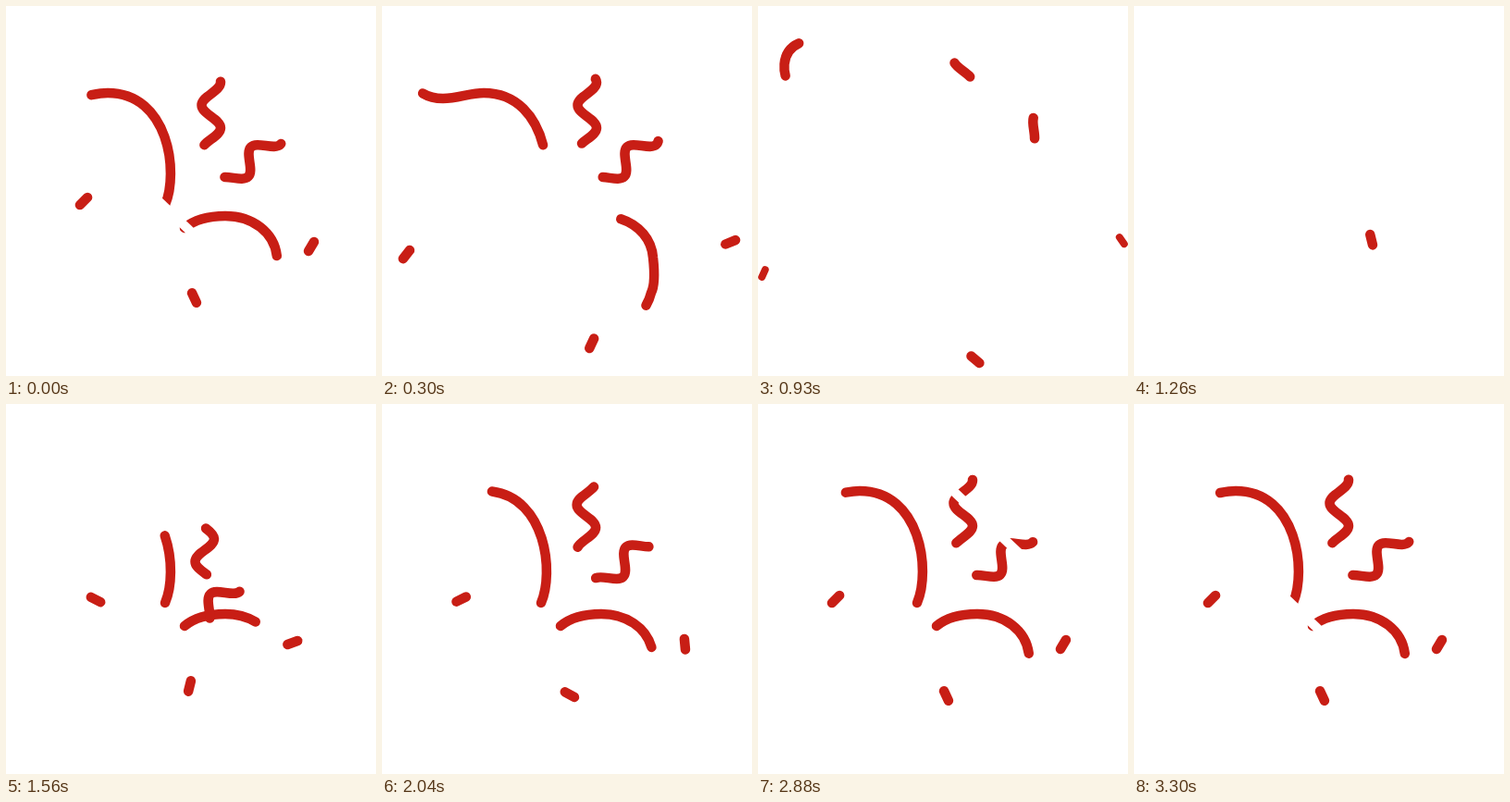
An HTML page that plays this animation: 400x400 px, repeating every 3.33 s.

```html
<!DOCTYPE html>
<html lang="en">
<head>
<meta charset="utf-8">
<title>Burst</title>
<style>
  html, body { margin: 0; width: 100%; height: 100%; overflow: hidden; background: #fff; }
  svg { display: block; width: 100vw; height: 100vh; }
  path { fill: none; stroke: #c81e15; stroke-width: 10.5; stroke-linecap: round; stroke-linejoin: round; }
  #wipe { stroke: #fff; stroke-width: 10; stroke-linecap: butt; }
</style>
</head>
<body>
<svg id="stage" viewBox="0 0 400 400"></svg>
<script>
const LOOP = 3330, STEP = 30, BURST = 1200, RATE = 4.3;
const stage = document.getElementById('stage');

function addPath(d = '') {
  const p = document.createElementNS('http://www.w3.org/2000/svg', 'path');
  p.setAttribute('d', d);
  stage.appendChild(p);
  return p;
}

const show = (el, on) => { el.style.visibility = on ? 'visible' : 'hidden'; };
const mix = (a, b, u) => a + (b - a) * u;

// Exponential settling while bursting: 1 at 1560 ms, falling towards 0.
const lagAt = (t, rate = RATE) => Math.exp(-rate * (t - 1560) / 1000);

// Rounded zigzag that climbs from y = 181.
function zigzag() {
  const x = i => i % 2 ? 211.5 : 232, y = i => 181 - 24.6 * i, bend = 9.5;
  let d = `M${x(0)} ${y(0)}`;
  for (let i = 1; i < 6; i++) {
    d += `C${x(i - 1)} ${y(i - 1) - bend} ${x(i)} ${y(i) + bend} ${x(i)} ${y(i)}`;
  }
  return d;
}

// tail, head: ends along the path at rest; *Lag: how far behind while bursting;
// tailPow, headPow: easing of the way out, which is over at `end`.
const arc = { tail: 0, tailLag: 0, tailPow: 1.18, headPow: 0.75 };
const wave = {
  d: zigzag(), tail: 40, head: 133, tailLag: 26, headLag: 52,
  rate: RATE, end: 1000, tailPow: 3.3, headPow: 1.95
};
const ribbons = [
  {
    ...arc, head: 176, headLag: 102, rate: 2.8, end: 1110,
    d: 'M172 215C187 180 176 94 110 94C95 94 82 100 66 100C40 100 27 82 28.5 63C30 46 42 38 60 37'
  },
  {
    ...arc, head: 124, headLag: 43, rate: 3.7, end: 900,
    d: 'M193 240C205 230 220 227 237 227C268 227 291 246 293 272C295 290 295 302 291 310'
      + 'C286 330 272 342 252 342.5C240 343 228 338 224 333'
  },
  { ...wave, delay: 0, at: [212, 106], turn: 0 },
  { ...wave, delay: 60, at: [266, 152], turn: 45 }
];

// lag: offset from rest at 1560 ms; turn: degrees still to spin then; outTurn: degrees spun by 630 ms.
const dashes = [
  { rest: [84, 211], drift: [-79.5, 79.5], lag: [13, 0.5], angle: -45, turn: 72, outTurn: -14, start: 1320, end: 1020 },
  { rest: [330, 260], drift: [64.5, -6.5], lag: [-20.2, -2], angle: 121, turn: -141, outTurn: 77, start: BURST, end: 1020 },
  { rest: [203.5, 315.5], drift: [32, 68], lag: [-5, -10.5], angle: 65, turn: -141, outTurn: 105, start: 1320, end: 1140 }
];

for (const r of ribbons) {
  r.el = addPath(r.d);
  r.length = r.el.getTotalLength();
}
for (const d of dashes) d.el = addPath('M-5.8 0H5.8');
const wipe = addPath('M-105 0H105');
wipe.id = 'wipe';

function drawRibbon(r, t) {
  const leaving = t < BURST, late = leaving ? 0 : lagAt(t - (r.delay || 0), r.rate);
  const u = leaving ? Math.min(1, t / r.end) : 0;
  const from = Math.max(0, mix(r.tail, r.length, u ** r.tailPow) - r.tailLag * late);
  const to = mix(r.head, r.length, u ** r.headPow) - r.headLag * late;
  show(r.el, to - from > 0.5);
  r.el.style.strokeDasharray = Math.max(0.1, to - from) + ' 2000';
  r.el.style.strokeDashoffset = -from;
  if (r.at) {
    const x = r.at[0] - 7 * late, y = r.at[1] + 14 * late;
    r.el.setAttribute('transform', `translate(${x} ${y}) rotate(${r.turn}) translate(-212 -106)`);
  }
}

function drawDash(d, t) {
  const leaving = t < BURST;
  show(d.el, leaving ? t < d.end : t >= d.start);
  const gone = 1 - Math.exp(-RATE * t / 1000), late = lagAt(t);
  const [x, y] = d.rest.map((v, i) => v + (leaving ? d.drift[i] * gone : d.lag[i] * late));
  const spin = leaving ? d.outTurn * t / 630 : d.turn * (Math.max(0, 2350 - t) / 790) ** 1.45;
  const size = leaving ? Math.max(0, Math.min(1, (d.end - t) / 120)) : 1;
  d.el.setAttribute('transform', `translate(${x} ${y}) rotate(${d.angle + spin}) scale(${size})`);
}

// White bar that slides down-left and stops at the mouth of the burst.
function drawWipe(t) {
  show(wipe, t < STEP || t >= 2730);
  const u = t < STEP ? 1 : Math.min(1, Math.max(0, t - 2700) / 600);
  const off = 134 * (1 - u ** 1.7);
  wipe.setAttribute('transform', `translate(183 228) rotate(43.4) translate(0 ${-off})`);
}

function draw(ms) {
  const t = Math.floor((ms % LOOP) / STEP) * STEP;
  ribbons.forEach(r => drawRibbon(r, t));
  dashes.forEach(d => drawDash(d, t));
  drawWipe(t);
}

const begin = performance.now();
function tick() {
  draw(performance.now() - begin);
  requestAnimationFrame(tick);
}
tick();
</script>
</body>
</html>
```
